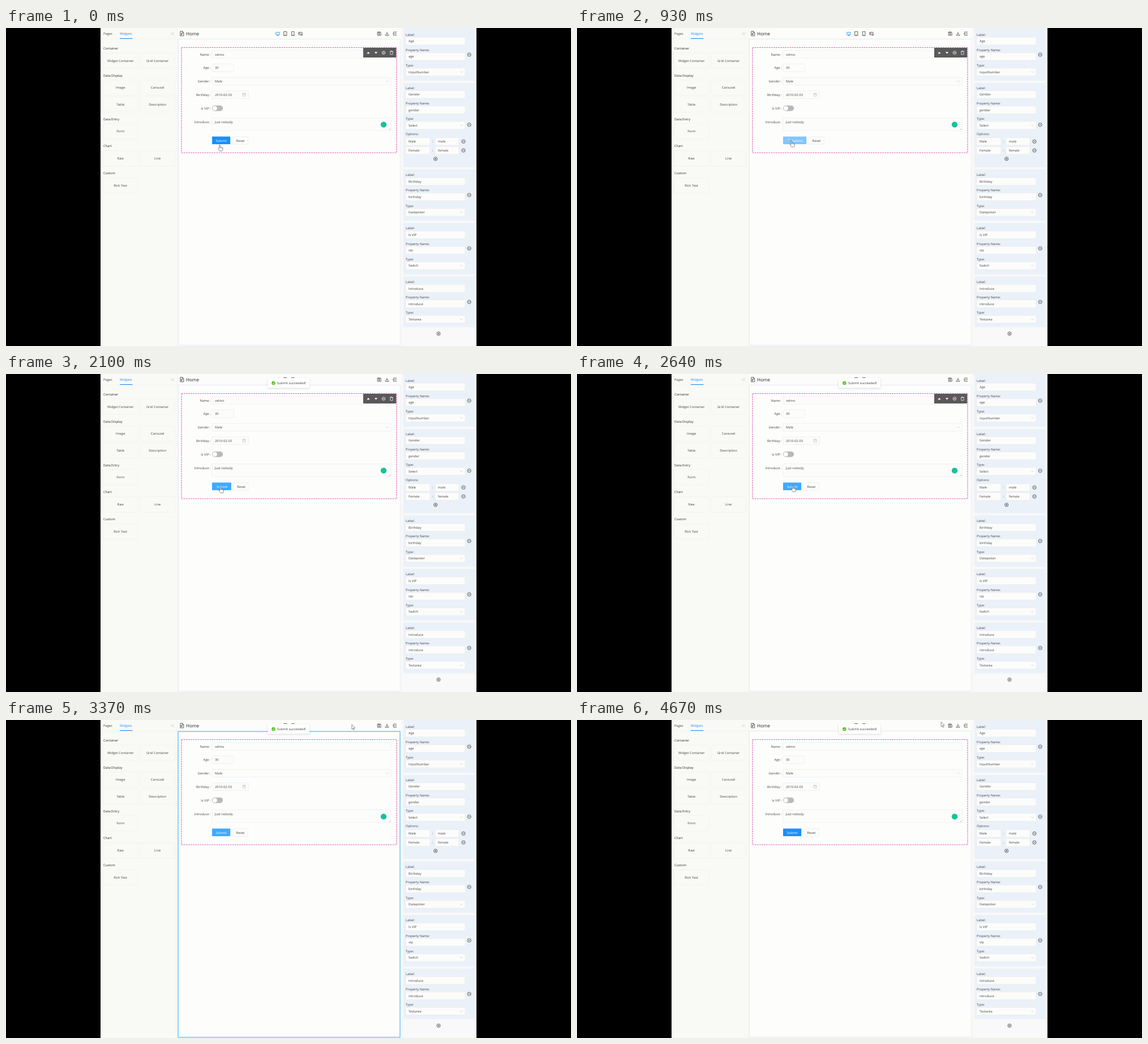
These frames come from a looping animation (998x561 px, 4.7 s). An HTML page:

```html
<!DOCTYPE html>
<html lang="en">
<head>
<meta charset="utf-8">
<title>Form builder</title>
<style>
html, body { margin: 0; width: 100%; height: 100%; overflow: hidden; background: #000; }
svg { display: block; width: 998px; height: 561px; }
text { font: 5.75px "Open Sans", "Noto Sans", sans-serif; fill: #444; text-rendering: geometricPrecision; }
.head { font-weight: 500; fill: #2b2b2b; }
.blue { fill: #1890ff; }
.white { fill: #fff; }
.title { font-size: 8.1px; fill: #222; }
.mid { text-anchor: middle; }
.end { text-anchor: end; }
.box { fill: #fcfcfb; stroke: #e5e7ed; stroke-width: .6; }
.tile { fill: none; stroke: #eeeeeb; stroke-width: .6; }
.line { fill: none; stroke: #333; stroke-width: .75; }
.soft { fill: none; stroke: #b5b5b5; stroke-width: .6; }

.anim { animation: 4.7s linear infinite; }
#hand { animation-name: hand; }
#arrow { animation-name: arrow; }
#bar { animation-name: bar; }
#ring { animation-name: ring; }
#toast { animation-name: toast; }
#submit { animation-name: dim; }
#face { animation-name: grow, tint; }
#word, #reset { animation-name: shift; }
#load { animation-name: load; }
#spin { transform-origin: 373.5px 198.4px; animation: spin 1s linear infinite; }

@keyframes hand {
  0%, 7.45% { transform: translate(377.5px, 206px); opacity: 1; animation-timing-function: ease-in-out; }
  11.9% { transform: translate(379px, 199px); }
  55.3% { transform: translate(379px, 199px); animation-timing-function: ease-in-out; }
  66.7% { transform: translate(552.5px, 22.5px); opacity: 1; }
  67.3% { transform: translate(556px, 21px); opacity: 1; }
  67.31%, 100% { transform: translate(556px, 21px); opacity: 0; }
}
@keyframes arrow {
  0%, 67.3% { transform: translate(557px, 20px); opacity: 0; }
  67.31% { transform: translate(557px, 20px); opacity: 1; animation-timing-function: ease-out; }
  71.6% { transform: translate(610.5px, 8px); }
  78% { transform: translate(626.3px, .3px); animation-timing-function: ease-in-out; }
  88%, 100% { transform: translate(643.3px, 3.2px); opacity: 1; }
}
@keyframes bar { 0%, 67.9% { opacity: 1; } 67.91%, 100% { opacity: 0; } }
@keyframes ring { 0%, 67.9% { opacity: 0; } 67.91%, 72.8% { opacity: 1; } 72.81%, 100% { opacity: 0; } }
@keyframes toast {
  0%, 40.6% { opacity: 0; transform: translateY(-7px); animation-timing-function: ease-out; }
  44.3%, 100% { opacity: 1; transform: none; }
}
@keyframes dim {
  0%, 13.2% { opacity: 1; }
  15%, 40.6% { opacity: .65; }
  42.5%, 100% { opacity: 1; }
}
@keyframes tint {
  0%, 10% { fill: #1890ff; }
  12.5%, 89.4% { fill: #40a9ff; }
  95.7%, 100% { fill: #1890ff; }
}
@keyframes grow {
  0%, 13.2% { width: 32.2px; animation-timing-function: cubic-bezier(.645, .045, .355, 1); }
  19.5%, 40.6% { width: 41.2px; animation-timing-function: cubic-bezier(.645, .045, .355, 1); }
  47%, 100% { width: 32.2px; }
}
@keyframes shift {
  0%, 13.2% { transform: none; animation-timing-function: cubic-bezier(.645, .045, .355, 1); }
  19.5%, 40.6% { transform: translateX(9px); animation-timing-function: cubic-bezier(.645, .045, .355, 1); }
  47%, 100% { transform: none; }
}
@keyframes load {
  0%, 13.2% { opacity: 0; }
  19.5%, 40.6% { opacity: 1; }
  45%, 100% { opacity: 0; }
}
@keyframes spin { to { transform: rotate(360deg); } }
</style>
</head>
<body>
<svg viewBox="0 0 998 561">
  <rect x="167" width="664" height="561" fill="#fcfcfa"/>
  <g id="side"></g>

  <rect x="304.5" y="19.6" width="391.8" height="539.9" fill="#fdfdfc" stroke="#e2e5f4" stroke-width=".8"/>
  <g id="top"></g>
  <rect x="310" y="34.5" width="380" height="185.5" fill="none" stroke="#e35cba" stroke-width="1.1" stroke-dasharray="2.8 1.3"/>
  <g id="form"></g>

  <g id="reset" class="anim">
    <rect class="box" x="400.3" y="191.7" width="27.4" height="13.3" rx=".8"/>
    <text class="mid" x="414" y="200.6">Reset</text>
  </g>
  <g id="submit" class="anim">
    <rect id="face" class="anim" x="364" y="191.4" width="32.2" height="13.7" rx=".8" fill="#1890ff"/>
    <g id="load" class="anim"><path id="spin" d="M373.5 195.7a2.7 2.7 0 0 1 2.7 2.7" fill="none" stroke="#fff" stroke-width=".7"/></g>
    <text id="word" class="anim mid white" x="380.2" y="200.6">Submit</text>
  </g>

  <g id="bar" class="anim">
    <rect x="631" y="35" width="58.2" height="17" fill="#595959"/>
    <path d="M637.4 45.2l2.6-3.2 2.6 3.2zM650.9 42.2l2.6 3.2 2.6-3.2z" fill="#fff"/>
    <g fill="none" stroke="#fff" stroke-width=".7">
      <path d="M667 40.5l2.7 1.6v3.1l-2.7 1.6-2.7-1.6v-3.1z"/>
      <circle cx="667" cy="43.6" r="1.1"/>
      <path d="M677.9 41.6h6M679.6 41.4v-1h2.6v1M678.6 41.8l.3 4.9h4l.3-4.9"/>
    </g>
  </g>
  <rect id="ring" class="anim" x="304" y="20.2" width="392" height="539.6" fill="none" stroke="#91d2fb" stroke-width="2"/>

  <g id="panel"></g>

  <g id="toast" class="anim">
    <rect x="462.3" y="7" width="73.6" height="17.6" rx="1" fill="#fefefe" style="filter:drop-shadow(0 1.2px 1.8px rgba(0,0,0,.15))"/>
    <circle cx="472.4" cy="16" r="3.2" fill="#52c41a"/>
    <path d="M470.8 16l1.2 1.3 2-2.6" fill="none" stroke="#fff" stroke-width=".8"/>
    <text x="479" y="18.1">Submit succeeded!</text>
  </g>

  <g id="hand" class="anim">
    <path d="M-.9 1Q-.9 0 0 0T.9 1V4.1Q1.9 3.6 2.4 4.4 3.4 4 3.8 4.9 5.3 4.6 5.4 6V8Q5.2 9.3 4.5 10.8H-.2Q-1.4 8.9-2.6 7.4-3.2 6.2-2.2 5.9-1.5 5.9-.9 6.7z" fill="#fff" stroke="#444" stroke-width=".6"/>
    <path d="M.9 4.1V6M2.4 4.5V6.2M3.8 5V6.4" stroke="#444" stroke-width=".45"/>
  </g>
  <path id="arrow" class="anim" d="M0 0V8.4L1.9 6.7 3.2 9.8 4.5 9.2 3.2 6.2H5.8z" fill="#fff" stroke="#444" stroke-width=".6"/>
</svg>

<script>
const put = (id, parts) => { document.getElementById(id).innerHTML = parts.join(''); };
// y is the middle of the line of text
const text = (x, y, s, cls = '') => `<text class="${cls}" x="${x}" y="${y + 2.1}">${s}</text>`;
const rect = (x, y, w, h, cls = 'box') => `<rect class="${cls}" x="${x}" y="${y}" width="${w}" height="${h}" rx=".8"/>`;
const path = (d, cls = 'line') => `<path class="${cls}" d="${d}"/>`;
const chevron = (x, y) => path(`M${x - 2} ${y - 1}l2 2 2-2`, 'soft');
const field = (x, y, w, s) => rect(x, y - 6.8, w, 13.6) + text(x + 5, y, s);
const round = (x, y, plus) => `<circle class="line" cx="${x}" cy="${y}" r="3.1"/>` +
  path(`M${x - 1.6} ${y}h3.2` + (plus ? `M${x} ${y - 1.6}v3.2` : ''));

// Widget list
const widgets = [
  [36, 'Container', ['Widget Container', 'Grid Container']],
  [83.5, 'Data Display', ['Image', 'Carousel', 'Table', 'Description']],
  [160.5, 'Data Entry', ['Form']],
  [208.3, 'Chart', ['Raw', 'Line']],
  [256, 'Custom', ['Rich Text']]
];
put('side', [
  '<rect x="167" width="136.5" height="561" fill="#f9f9f6"/>',
  path('M167 19.4H303M303.2 0V561', 'tile'),
  text(172, 10.3, 'Pages'), text(201, 10.3, 'Widgets', 'blue'),
  '<rect class="blue" x="201" y="18" width="22.4" height="1.1"/>',
  path('M294 7.6l-2.3 2.4 2.3 2.4M296.8 7.6l-2.3 2.4 2.3 2.4', 'soft'),
  ...widgets.map(([y, name, items]) => text(172, y, name, 'head') + items.map((s, i) => {
    const x = 202.2 + i % 2 * 65.4, cy = y + 21.7 + (i >> 1) * 29.6;
    return rect(x - 30.5, cy - 13.5, 61, 27, 'tile') + text(x, cy, s, 'mid');
  }).join(''))
]);

// Header icons
put('top', [
  path('M307.8 5.8h3.8l2.2 2.2v5.8h-6zM311.4 5.8v2.4h2.4M309.4 9v3.2l2.4-1.6z'),
  text(318, 10.6, 'Home', 'title'),
  '<path d="M476.8 7.6h6.4v4.2h-6.4zM480 11.8v1.5M478 13.3h4" fill="none" stroke="#1890ff" stroke-width=".8"/>',
  path('M490.6 6.4h5.3v7h-5.3zM492.4 12.2h1.7M504.5 6.4h4.5v7h-4.5zM506.1 12.2h1.4'),
  path('M523 9.5V7.6h-6v4.4h3M517 9.5h3M521 10.5h2.4v2.4H521z'),
  path('M656.2 7h4.8l1.2 1.2v4.8h-6zM657.8 7v1.8h2.5V7'), '<circle class="line" cx="659.2" cy="10.9" r=".9"/>',
  path('M673 6.8v4.4M671.2 9.5l1.8 1.8 1.8-1.8M670.1 11.3v1.8h5.8v-1.8'),
  path('M684 7.2h6M686.4 10h3.6M684 12.8h6M684 8.6v2.8l1.5-1.4z')
]);

// Form
const labels = ['Name', 'Age', 'Gender', 'Birthday', 'Is VIP', 'Introduce'];
put('form', [
  ...labels.map((s, i) => text(358.6, 46.4 + i * 23.8, s, 'end') + text(359.4, 46.4 + i * 23.8, ':')),
  field(364, 46.4, 316, 'velmo'),
  field(364, 70.1, 38.6, '30'),
  field(364, 94, 316, 'Male'), chevron(673.5, 94),
  field(364, 117.6, 64.3, '2010-02-03'),
  path('M418.3 115.4h4.8v4.8h-4.8zM418.3 117h4.8M419.7 114.6v1.4M421.7 114.6v1.4', 'soft'),
  '<rect x="364" y="136.8" width="19.2" height="9.6" rx="4.8" fill="#b9b9b9"/><circle cx="368.9" cy="141.6" r="3.9" fill="#fff"/>',
  rect(364, 158.6, 316, 22.4), text(369, 165.4, 'Just nobody'),
  '<circle cx="667" cy="170.4" r="5.2" fill="#15c39a"/>',
  path('M676.3 180l3-3M678 180l1.3-1.3', 'soft')
]);

// Property cards: top of text, card top, card bottom, values
const cards = [
  [11.5, -3, 93, 'Age', 'age', 'InputNumber'],
  [105.6, 97, 245.5, 'Gender', 'gender', 'Select'],
  [259.1, 249.5, 340, 'Birthday', 'birthday', 'Datepicker'],
  [353.3, 344, 434.5, 'Is VIP', 'vip', 'Switch'],
  [447.8, 438.5, 527.5, 'Introduce', 'introduce', 'Textarea']
];
const names = ['Label:', 'Property Name:', 'Type:'];
put('panel', [
  '<rect x="698.5" width="132.5" height="561" fill="#f8f9f8"/>',
  path('M698.5 0V561', 'tile'),
  ...cards.map(([y, top, end, ...vals]) =>
    `<rect x="702" y="${top}" width="125.5" height="${end - top}" fill="#ebf1f9"/>` +
    vals.map((v, i) => text(706, y + i * 27.2, names[i]) + field(706, y + 11.6 + i * 27.2, 105, v)).join('') +
    chevron(804.5, y + 66) + round(818.2, y + (vals[0] === 'Gender' ? 65 : 35.5))),
  text(706, 187.3, 'Options:'),
  ...['Male', 'Female'].map((s, i) => {
    const y = 200.2 + i * 15.8;
    return field(706, y, 43, s) + text(752.5, y, ':') + field(758, y, 42, s.toLowerCase()) + round(808, y);
  }),
  round(758.7, 230.8, true), round(764, 539.2, true)
]);
</script>
</body>
</html>
```
